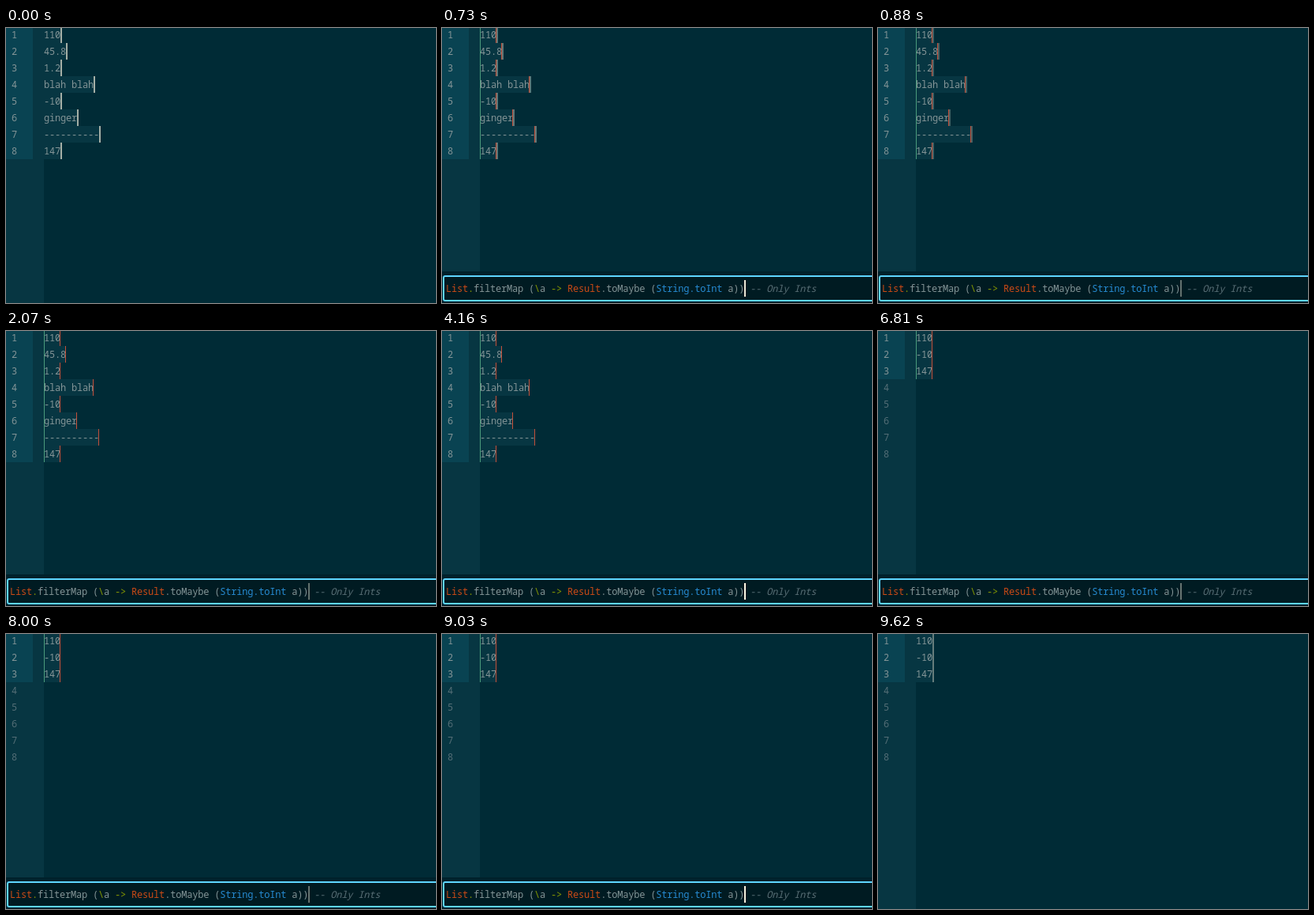
An HTML page that plays this animation: 545 by 348 pixels, repeating every 9720 ms.

```html
<!DOCTYPE html>
<html lang="en">
<head>
<meta charset="utf-8">
<title>Editor filter</title>
<style>
  html, body { margin: 0; width: 100%; height: 100%; overflow: hidden; background: #002b36; }
  svg { display: block; }
  text { font: 12px "Noto Sans Mono", "DejaVu Sans Mono", monospace; letter-spacing: -0.2px; fill: #839496; white-space: pre; }
  .type { fill: #cb4b16; }
  .op { fill: #859900; }
  .call { fill: #268bd2; }
  .note { fill: #586e75; font-style: italic; }
</style>
</head>
<body>
<svg id="stage" width="545" height="348" viewBox="0 0 545 348">
  <rect width="545" height="348" fill="#002b36"/>
  <rect width="48" height="348" fill="#073642"/>
  <g id="before"></g>
  <g id="after"></g>
  <g id="panel">
    <rect y="308" width="545" height="40" fill="#00212b"/>
    <rect x="2" y="314" width="548" height="31" rx="2" fill="#001b22" stroke="#5fd6ff" stroke-width="2"/>
    <text x="5" y="334"><tspan class="type">List</tspan><tspan class="op">.</tspan>filterMap (<tspan class="op">\</tspan>a <tspan class="op">-&gt;</tspan> <tspan class="type">Result</tspan>.toMaybe (<tspan class="call">String.toInt</tspan> a)) <tspan class="note">-- Only Ints</tspan></text>
    <rect id="caret" x="383" y="319" width="2" height="21" fill="#fdf6e3"/>
  </g>
</svg>
<script>
const LOOP = 9720, OPEN = 150, FILTER = 6070, CLOSE = 9180;
const BLINK = 1187, FADE = 500, BLINK_START = 715;
const ROW = 21, CHAR = 7, LEFT = 48;
const START_MARK = '#4a9a7c', END_MARK = '#c4503a';
const byId = id => document.getElementById(id);

function add(parent, tag, attrs, content = '') {
  const node = document.createElementNS('http://www.w3.org/2000/svg', tag);
  for (const key in attrs) node.setAttribute(key, attrs[key]);
  node.textContent = content;
  parent.append(node);
  return node;
}

function buildDocument(group, lines) {
  const height = lines.length * ROW - 2;
  add(group, 'rect', { width: 34, height, fill: '#094352' });
  lines.forEach((line, i) => {
    add(group, 'rect', { x: LEFT, y: i * ROW - 2, width: line.length * CHAR, height: ROW, fill: '#073642' });
    add(group, 'text', { x: LEFT, y: i * ROW + 13 }, line);
  });
  for (let i = 0; i < 8; i++) {
    add(group, 'text', { x: 7, y: i * ROW + 13, style: `fill:${i < lines.length ? '#839496' : '#546e76'}` }, i + 1);
  }
  const marks = add(group, 'g', {});
  const carets = add(group, 'g', { fill: '#fdf6e3' });
  add(marks, 'rect', { x: LEFT, width: 1, height, fill: START_MARK });
  lines.forEach((line, i) => {
    const x = LEFT + line.length * CHAR, y = i * ROW - 2;
    add(marks, 'rect', { x: x - 1, y, width: 1, height: ROW, fill: END_MARK });
    add(carets, 'rect', { x, y, width: 2, height: ROW });
  });
  return { group, marks, carets };
}

const before = buildDocument(byId('before'),
  ['110', '45.8', '1.2', 'blah blah', '-10', 'ginger', '----------', '147']);
const after = buildDocument(byId('after'), ['110', '-10', '147']);

const clamp = v => Math.min(1, Math.max(0, v));
const ease = v => 1 - (1 - clamp(v)) ** 2.3;

// One half period fading out, the next fading back in.
function blink(t) {
  if (t < BLINK_START) return 1;
  const p = (t - BLINK_START) % BLINK, half = BLINK / 2;
  return p < half ? 1 - ease(p / FADE) : ease((p - half) / FADE);
}

function editorCaret(t) {
  if (t < OPEN) return 0.65;
  if (t < CLOSE) return 0.65 * (1 - clamp((t - OPEN) / 1030) ** 1.5);
  return (t - CLOSE) / 1100;
}

function show(node, visible) {
  node.setAttribute('visibility', visible ? 'inherit' : 'hidden');
}

function render(t) {
  const open = t >= OPEN && t < CLOSE;
  show(byId('panel'), open);
  show(before.group, t < FILTER);
  show(after.group, t >= FILTER);
  for (const doc of [before, after]) {
    show(doc.marks, open);
    doc.carets.setAttribute('opacity', editorCaret(t));
  }
  byId('caret').setAttribute('opacity', blink(t));
}

const start = performance.now();
function tick() {
  render((performance.now() - start) % LOOP);
  requestAnimationFrame(tick);
}
tick();
</script>
</body>
</html>
```
